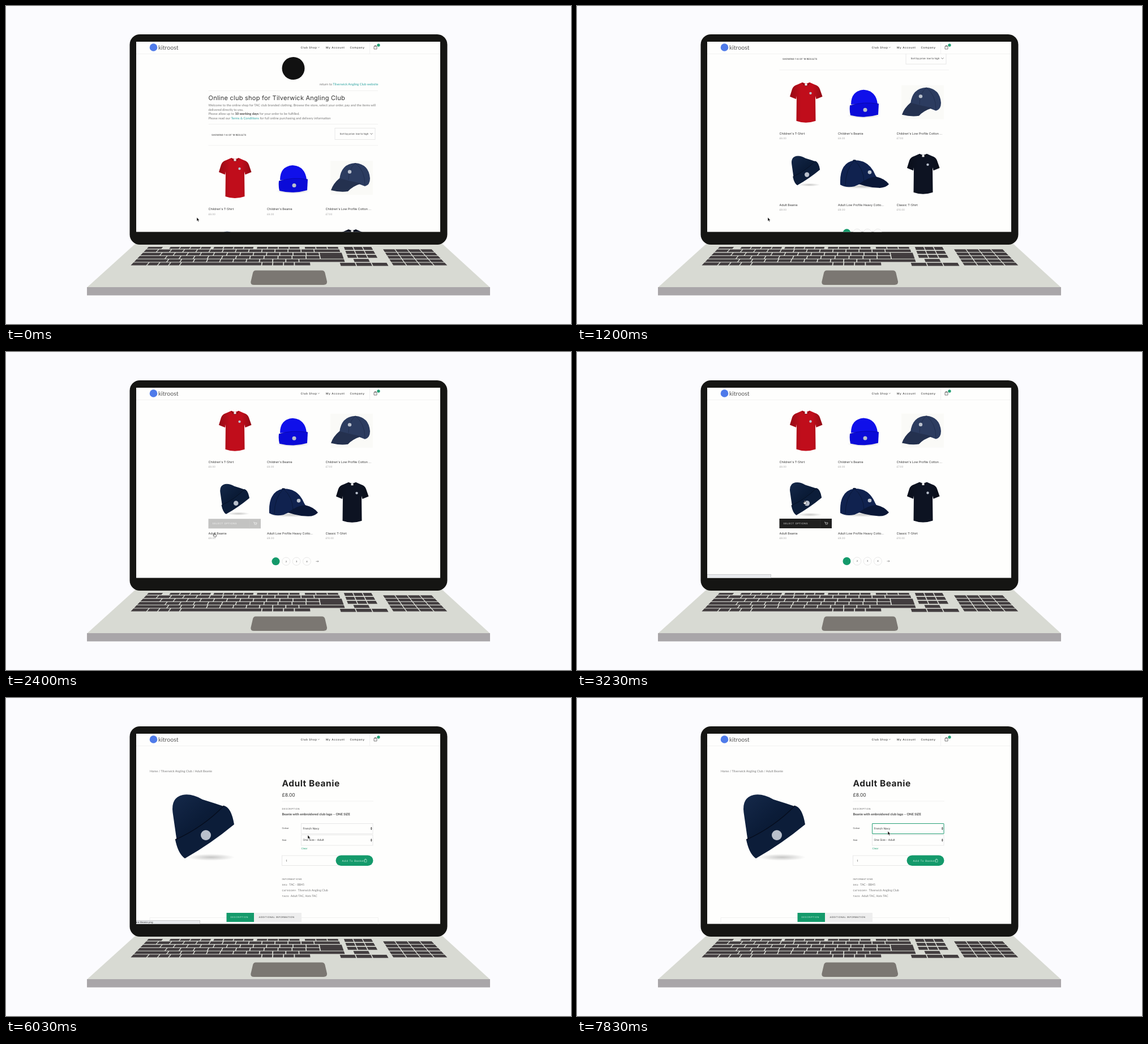
These frames come from a looping animation (998 by 561 pixels, 8 s). An HTML page:

```html
<!DOCTYPE html>
<html lang="en">
<head>
<meta charset="utf-8">
<title>Club shop on a laptop</title>
<style>
  html, body { margin: 0; width: 100%; height: 100%; overflow: hidden; background: #fbfbfe; }
  svg { display: block; width: 100vw; height: 100vh; }
  text { font-family: Inter, "Open Sans", sans-serif; fill: #333; white-space: pre; text-rendering: geometricPrecision; }
  .nav { font-size: 4.7px; font-weight: 500; letter-spacing: .65px; }
  .body { font-family: Lato, sans-serif; font-size: 5.75px; fill: #777; }
  .dark { fill: #333; }
  .bold { font-weight: 700; fill: #444; }
  .link { fill: #2ba3a0; }
  .small { font-size: 4.3px; }
  .item { font-size: 5.4px; }
  .price { font-size: 4.6px; fill: #a5a5a5; }
  .caps { font-size: 3.9px; letter-spacing: .5px; fill: #555; }
  .field { font-size: 4.8px; }
  .num { font-size: 3.8px; text-anchor: middle; }
  .rule { fill: none; stroke: #eeeeee; stroke-width: .8; }
  .box { fill: #fefefd; stroke: #e3e3e3; stroke-width: .8; }
  .icon { fill: none; stroke: #444; stroke-width: .7; }
  .green { fill: #149a6b; }
  .mark { fill: #b9c0cc; }
</style>
</head>
<body>
<svg viewBox="0 0 998 561" preserveAspectRatio="none">
  <defs>
    <clipPath id="screen"><rect x="230" y="63" width="537" height="335.5"/></clipPath>
    <clipPath id="below"><rect x="230" y="84" width="537" height="315"/></clipPath>
    <linearGradient id="shade">
      <stop offset="0" stop-opacity=".22"/><stop offset=".35" stop-opacity="0"/>
      <stop offset=".7" stop-opacity="0"/><stop offset="1" stop-opacity=".25"/>
    </linearGradient>
    <linearGradient id="knit" x1="0" y1="0" x2="1" y2="1">
      <stop offset="0" stop-color="#15294a"/><stop offset=".5" stop-color="#0b1c38"/><stop offset="1" stop-color="#07152b"/>
    </linearGradient>
    <radialGradient id="shadow">
      <stop offset="0" stop-opacity=".22"/><stop offset="1" stop-opacity="0"/>
    </radialGradient>
    <path id="shirtShape" d="M398 268Q404.500 271.500 411 268L420 272Q427 274 429 280L433.500 293L422.500 297.500L421 292L421.500 336Q404 342 387.500 336L388 292L387 297.500L376 293L380 280Q382 274 389 272Z"/>
    <g id="shirt">
      <use href="#shirtShape" fill="currentColor"/>
      <use href="#shirtShape" fill="url(#shade)"/>
      <path d="M398 268.500Q404.500 279 411 268.500" fill="none" stroke="#000" stroke-opacity=".35" stroke-width="1.200"/>
      <rect x="402.500" y="269.500" width="4" height="4" fill="#eee"/>
      <circle class="mark" cx="412.500" cy="287" r="2.200"/>
    </g>
    <g id="beanie">
      <ellipse cx="362" cy="281" rx="42" ry="6" fill="url(#shadow)"/>
      <path d="M302 254L294.500 202Q291 176 312 171Q328 168 347 179Q370 186 390 193L350 230Z" fill="url(#knit)"/>
      <path d="M299 250Q348 228 385 190Q398 193 403 223Q362 257 316 283Q304 275 299 250Z" fill="#0c1d39"/>
      <path d="M299 250Q348 228 385 190" fill="none" stroke="#050d1e" stroke-width="1.500"/>
      <circle class="mark" cx="353" cy="242" r="9"/>
    </g>
  </defs>

  <rect width="998" height="561" fill="#fbfbfe"/>
  <path d="M230 418H769L855 496.500H143Z" fill="#d8dad3"/>
  <rect x="143" y="496" width="712" height="14.500" fill="#a9a6a9"/>
  <path d="M441 466.500H558Q562.500 466.500 563.500 471L567 486Q567.500 492 561 492H438Q431.500 492 432.500 486L436 471Q437 466.500 441 466.500Z" fill="#7b7772"/>
  <path id="keys" fill="#423d3f"/>
  <rect x="218.500" y="50" width="561" height="371" rx="18" fill="#151513"/>
  <rect x="230" y="63" width="537" height="335.500" fill="#fefefd"/>

  <g clip-path="url(#screen)">
    <g id="shop" clip-path="url(#below)">
      <g id="scroll">
        <circle cx="507.500" cy="110" r="20" fill="#111"/>
        <text class="body" x="657.500" y="139.500" text-anchor="end">return to <tspan class="link">Tilverwick Angling Club website</tspan></text>
        <path class="rule" d="M357.500 149.500H657M357.500 208.500H657M357.500 246H657"/>
        <text x="357.500" y="166" font-size="11" letter-spacing=".25">Online club shop for Tilverwick Angling Club</text>
        <text class="body" x="357.500" y="177">Welcome to the online shop for TAC club branded clothing. Browse the store, select your order, pay and the items will</text>
        <text class="body" x="357.500" y="184.500">delivered directly to you.</text>
        <text class="body" x="357.500" y="192">Please allow up to <tspan class="bold">10 working days</tspan> for your order to be fulfilled.</text>
        <text class="body" x="357.500" y="199.500">Please read our <tspan class="link">Terms &amp; Conditions</tspan> for full online purchasing and delivery information</text>
        <text class="small" x="363" y="228.500">SHOWING 1-6 OF 19 RESULTS</text>
        <rect class="box" x="581" y="215.500" width="71" height="20"/>
        <text class="small" x="589.500" y="227">Sort by price: low to high</text>
        <path class="icon" d="M643.500 224.500l2 2 2-2" stroke-width=".5"/>

        <use href="#shirt" color="#c00d1b"/>
        <g>
          <ellipse cx="507" cy="327" rx="30" ry="4" fill="url(#shadow)"/>
          <path d="M484 307Q484 283 506 281Q528 282 531 306Z" fill="#1010ea"/>
          <path d="M482 309Q507 301 533 306L532 325Q507 332 483 326Q481 318 482 309Z" fill="#0b0bd8"/>
          <path d="M482 309Q507 301 533 306" fill="none" stroke="#0707a0" stroke-width=".8"/>
          <circle class="mark" cx="509" cy="316.500" r="3.500"/>
        </g>
        <g>
          <rect x="573" y="273" width="75" height="60" fill="#fafaf7"/>
          <path d="M589 306Q592 278 617 277Q641 279 643 304Q643 316 634 318Q612 309 589 306Z" fill="#2c3c60"/>
          <path d="M589 304Q578 313 574 325Q590 329 604 327Q612 318 628 313Q608 309 589 304Z" fill="#24314f"/>
          <path d="M617 277Q605 288 605 307M617 277Q634 290 634 316" fill="none" stroke="#1c2843" stroke-width=".6"/>
          <circle class="mark" cx="607" cy="292.500" r="3.200"/>
        </g>
        <g id="hat"><use href="#beanie" transform="translate(379 397.500) scale(.46) translate(-294 -170)"/></g>
        <g transform="translate(0 157.500)">
          <ellipse cx="505" cy="294" rx="42" ry="4" fill="url(#shadow)"/>
          <path d="M465 291Q463 252 490 248Q516 247 527 274Q531 279 530 284Q505 286 490 294Q475 297 465 291Z" fill="#10224f"/>
          <path d="M498 290Q515 277 529 277Q543 280 551 290Q545 297 533 296.500Q517 296 498 290Z" fill="#0a1737"/>
          <path d="M490 248Q506 262 507 285M490 248Q474 264 474 293" fill="none" stroke="#081530" stroke-width=".7"/>
          <ellipse cx="490" cy="248" rx="3" ry="1.200" fill="#0a1737"/>
          <circle class="mark" cx="517" cy="269" r="3.300"/>
        </g>
        <use href="#shirt" x="207" y="126" color="#0d1322"/>
        <g id="items"></g>

        <g id="choose">
          <rect x="357.500" y="458.500" width="92.500" height="17" fill="#1f1f1f"/>
          <text x="364.500" y="468.500" font-size="4.200" letter-spacing=".55" style="fill:#ddd">SELECT OPTIONS</text>
          <path d="M430 458.500V475.500" stroke="#333" stroke-width=".7"/>
          <path class="icon" style="stroke:#ddd" d="M437 464.500h1.300l1 3.800h3l.8-2.800h-4.300M439.700 469.800h.2M442 469.800h.2"/>
        </g>
        <g id="pages"></g>
      </g>
    </g>

    <g id="product">
      <g id="top">
        <text class="body" x="254" y="131" font-size="5.400" style="font-size:5.400px">Home / Tilverwick Angling Club / Adult Beanie</text>
        <text x="487.500" y="156" font-size="15.500" font-weight="700" letter-spacing=".5" style="fill:#222">Adult Beanie</text>
        <text x="487.500" y="173.500" font-size="8.500">£8.00</text>
        <path class="rule" d="M487.500 182H649"/>
        <text class="caps" x="487.500" y="196.700">DESCRIPTION</text>
        <text class="body bold" x="487.500" y="207">Beanie with embroidered club logo – ONE SIZE</text>
        <text x="487.500" y="231" font-size="3.900">Colour</text>
        <text x="487.500" y="251.500" font-size="3.900">Size</text>
      </g>
      <use id="photo" href="#beanie"/>
      <g id="fields">
        <rect class="box" x="521.500" y="221.500" width="126.500" height="18"/>
        <rect class="box" x="521.500" y="241.500" width="126.500" height="18.500"/>
        <rect id="focus" x="521.500" y="221.500" width="126.500" height="18" rx=".5" fill="none" stroke="#149a6b" stroke-width=".9"/>
        <text class="field" x="524.500" y="231.900">French Navy</text>
        <text class="field" x="524.500" y="252.400">One Size - Adult</text>
        <path d="M643.900 229.700l1.400-2 1.400 2zM643.900 230.700l1.400 2 1.400-2zM643.900 250.200l1.400-2 1.400 2zM643.900 251.200l1.400 2 1.400-2z" fill="#222"/>
      </g>
      <text id="clear" class="green" x="521.500" y="267" font-size="4.300">Clear</text>
      <g id="lower">
        <rect class="box" x="487.500" y="278" width="100" height="17.500"/>
        <text class="field" x="494.500" y="288.700">1</text>
        <rect class="green" x="582.500" y="277.500" width="66" height="18.500" rx="9.250"/>
        <text x="593.500" y="288.700" font-size="4.600" letter-spacing=".7" style="fill:#d8f3e8">Add To Basket</text>
        <path class="icon" style="stroke:#d8f3e8;stroke-width:.5" d="M633 285.200h4v4.200h-4zM634 285.200v-1.200h2v1.200"/>
        <text class="caps" x="487.500" y="320.500">INFORMATIONS</text>
        <text class="caps" x="487.500" y="331.200">SKU: <tspan class="body" style="font-size:5.200px;letter-spacing:0">TAC - BB45</tspan></text>
        <text class="caps" x="487.500" y="341.200">CATEGORY: <tspan class="body" style="font-size:5.200px;letter-spacing:0">Tilverwick Angling Club</tspan></text>
        <text class="caps" x="487.500" y="351.200">TAGS: <tspan class="body" style="font-size:5.200px;letter-spacing:0">Adult TAC, Hats TAC</tspan></text>
        <path class="rule" d="M254 440V387.500H657.500V440"/>
        <rect class="green" x="389.500" y="379" width="48.500" height="16"/>
        <rect x="438" y="379" width="84" height="16" fill="#eeeeee"/>
        <text class="caps" x="396.500" y="388.400" style="fill:#c9efdf">DESCRIPTION</text>
        <text class="caps" x="446.500" y="388.400" style="fill:#333">ADDITIONAL INFORMATION</text>
        <text class="body bold" x="261.500" y="412.500">Beanie with embroidered club logo</text>
      </g>
    </g>

    <g id="header">
      <rect x="230" y="63" width="537" height="21" fill="#fefefd"/>
      <path class="rule" d="M230 84.500H767M642.500 63V84"/>
      <circle cx="260.500" cy="73" r="6.800" fill="#4f7bea"/>
      <text x="269" y="76.700" font-size="10.500" style="font-family:Lato,sans-serif;fill:#555">kitroost</text>
      <text class="nav" x="520.500" y="74.700">Club Shop</text>
      <path class="icon" d="M550.800 72.300l1.500 1.300 1.500-1.300" style="stroke-width:.5"/>
      <text class="nav" x="565" y="74.700">My Account</text>
      <text class="nav" x="607.500" y="74.700">Company</text>
      <path class="icon" d="M650 71.200h5v4.800h-5zM651.300 71.200v-1.500h2.400v1.500"/>
    </g>
    <circle class="green" cx="658" cy="69" r="2.600"/>
    <text x="658" y="70" font-size="2.800" text-anchor="middle" style="fill:#cfeee1">1</text>

    <g id="status">
      <rect x="229" y="392.500" width="113.500" height="7" fill="#e9ebee" stroke="#bbb" stroke-width=".7"/>
      <text id="file" x="229" y="397" font-size="4.200">are-Beanie.png</text>
    </g>
    <g id="cursor">
      <path id="arrow" d="M0 0V6.400L1.500 5.100L2.600 7.400L3.700 6.900L2.600 4.700H4.600Z" fill="#111" stroke="#fff" stroke-width=".35"/>
      <path id="hand" d="M-.6.4Q0-.4.600.4V2.400L3 3Q3.400 3.200 3.200 4.200L2.700 6.600H-.5L-2.500 4Q-2.400 3-1.400 3.400L-.6 4Z" fill="#fff" stroke="#111" stroke-width=".6"/>
    </g>
  </g>
</svg>
<script>
const $ = id => document.getElementById(id);

// Keyboard: rows of keys whose widths are hex digits, fanned out from the middle.
const fan = (x, y) => (499 + (x - 499) * (1 + (y - 425) * .0039)).toFixed(1);
function row(y0, y1, x0, x1, widths) {
  const w = [...widths].map(c => parseInt(c, 16));
  const unit = (x1 - x0) / w.reduce((a, b) => a + b);
  let x = x0;
  return w.map(n => {
    const a = x + .8, b = (x += n * unit) - .8;
    return `M${fan(a, y0)} ${y0}L${fan(b, y0)} ${y0}L${fan(b, y1)} ${y1}L${fan(a, y1)} ${y1}Z`;
  }).join('');
}
const fn = [[251, 278, '1'], [290, 363, '1111'], [367, 438, '1111'], [443, 519, '1111'], [527, 587, '111']];
let keys = fn.map(([a, b, w]) => row(425, 428.2, a, b, w)).join('');
keys += row(429.4, 434, 251, 588, '22222222222224');
keys += row(435.2, 439.9, 251, 551, '3222222222222');
keys += row(435.2, 445.7, 551, 590, '1');
keys += row(441, 445.7, 251, 551, '422222222222');
keys += row(446.8, 451.4, 251, 590, '522222222227');
keys += row(452.6, 457.6, 251, 534, '3222f2223');
for (const y of [425, 432, 439]) keys += row(y, y + 5.2, 596, 646, '111');
keys += row(446.2, 451.4, 604, 630, '1') + row(453, 458.4, 580, 656, '111');
for (let i = 0; i < 5; i++) keys += row(429.2 + i * 5.9, 434 + i * 5.9, 662.5, 748.5, '1111');
$('keys').setAttribute('d', keys);

const goods = [
  ["Children's T-Shirt", 6], ["Children's Beanie", 6], ["Children's Low Profile Cotton ...", 7],
  ['Adult Beanie', 8], ['Adult Low Profile Heavy Cotto...', 8], ['Classic T-Shirt', 10]
];
$('items').innerHTML = goods.map(([name, cost], i) => {
  const x = 357.5 + i % 3 * 103.5, y = 360 + (i > 2) * 126;
  return `<text class="item" x="${x}" y="${y}">${name}</text><text class="price" x="${x}" y="${y + 8.6}">£${cost}.00</text>`;
}).join('');

$('pages').innerHTML = [1, 2, 3, 4].map(n => {
  const x = 458.2 + n * 18.3;
  return `<circle cx="${x}" cy="533.5" r="7" ${n > 1 ? 'class="box"' : 'class="green"'}/>
    <text class="num" x="${x}" y="534.9" ${n > 1 ? '' : 'style="fill:#0b7a53"'}>${n}</text>`;
}).join('') + '<path class="icon" style="stroke-width:.5" d="M547.500 533.500h4.500M550.500 532l1.500 1.500-1.500 1.500"/>';

const ease = (a, b, t) => {
  const k = Math.min(1, Math.max(0, (t - a) / (b - a)));
  return k * k * (3 - 2 * k);
};
const track = [
  [1800, 337, 373], [3030, 402, 262], [5230, 402, 262], [6030, 533, 242],
  [6830, 541, 240], [7030, 541, 240], [7830, 549, 235]
];
function pointer(t) {
  let [, x, y] = track[0];
  for (let i = 1; i < track.length; i++) {
    const [t0, x0, y0] = track[i - 1], [t1, x1, y1] = track[i], k = ease(t0, t1, t);
    x += (x1 - x0) * k;
    y += (y1 - y0) * k;
  }
  return [x, y];
}
const move = (id, x, y) => $(id).setAttribute('transform', `translate(${x} ${y})`);
const fade = (id, v) => $(id).setAttribute('opacity', v);
const show = (id, on) => { $(id).style.display = on ? '' : 'none'; };

const tick = t => t < 3030 ? Math.min(2800, Math.floor(t / 200) * 200) : 3030 + Math.floor((t - 3030) / 200) * 200;

function draw(t) {
  const opened = t >= 4830, loaded = t >= 5030;
  show('shop', !opened);
  show('product', opened);
  show('header', !opened || loaded);

  move('scroll', 0, t < 800 ? 0 : 142 * .47 ** ((t - 800) / 200) - 164.5);
  const hover = ease(2200, 2800, t), s = 1 + .12 * hover;
  $('hat').setAttribute('transform', `translate(404 424.500) scale(${s}) translate(-404 -424.500)`);
  fade('choose', hover);

  move('top', 0, loaded ? 0 : -21);
  move('fields', 0, loaded ? 0 : -22.3);
  move('lower', 0, loaded ? 0 : -24);
  show('clear', loaded);
  fade('photo', ease(4830, 5430, t));
  fade('focus', ease(7030, 7630, t));

  const link = ease(2400, 2800, t) * (opened && t < 5230 ? .2 : 1);
  fade('status', link * (1 - ease(6030, 6430, t)));
  show('file', opened && t >= 5230);

  move('cursor', ...pointer(t));
  const hand = t >= 2400 && t < 5630;
  show('hand', hand);
  show('arrow', !hand);
}

const start = performance.now();
function loop() {
  draw(tick((performance.now() - start) % 8000));
  requestAnimationFrame(loop);
}
loop();
</script>
</body>
</html>
```
